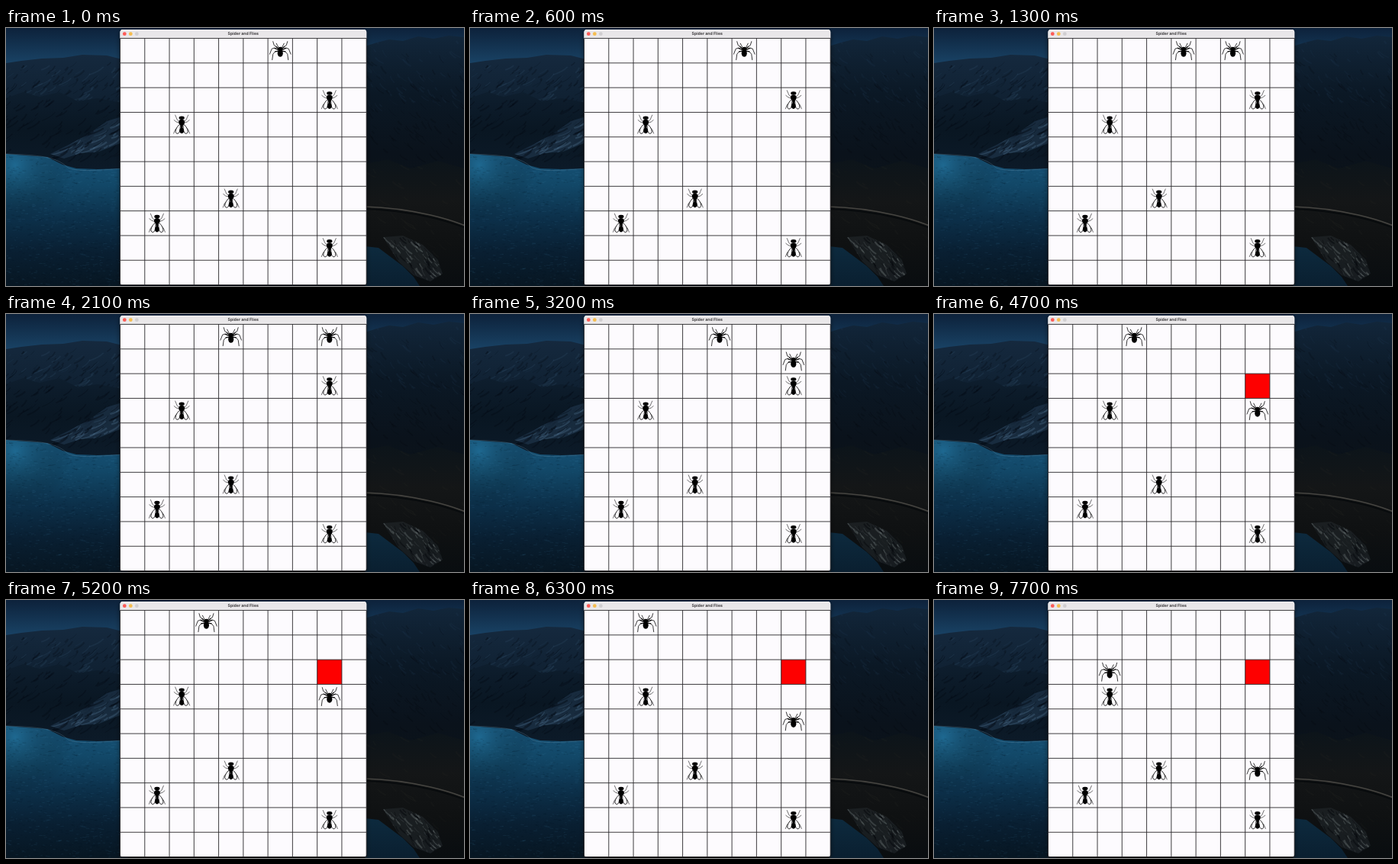
Animation of 600x338 px, one loop 8000 ms. Source, as an HTML page with a canvas:

```html
<!DOCTYPE html>
<html lang="en">
<head>
<meta charset="utf-8">
<title>Spider and Flies</title>
<style>
html, body { margin: 0; width: 100%; height: 100%; overflow: hidden; background: #0a1420; }
canvas { display: block; width: 100vw; height: 100vh; }
</style>
</head>
<body>
<canvas id="stage"></canvas>
<script>
const W = 600, H = 338, LOOP = 8000;
const FIRST_MOVE = 700, MOVE_EVERY = 1000;
const LEFT = 149.5, TOP = 13.55, CELL_W = 32.27, CELL_H = 32.3, SIZE = 10;

// Cells are [column, row]; one entry per move.
const spiders = [
  [[6, 0], [5, 0], [4, 0], [5, 0], [4, 0], [3, 0], [2, 0], [2, 1], [2, 2]],
  [[6, 0], [7, 0], [8, 0], [8, 1], [8, 2], [8, 3], [8, 4], [8, 5], [8, 6]]
];
const flies = [[8, 2], [2, 3], [4, 6], [1, 7], [8, 8]];

const canvas = document.getElementById('stage');
const scale = window.devicePixelRatio || 1;
canvas.width = W * scale;
canvas.height = H * scale;
const ctx = canvas.getContext('2d');
ctx.scale(scale, scale);

function seeded(seed) {
  return () => (seed = (seed * 16807) % 2147483647) / 2147483647;
}

function vertical(y0, y1, ...colors) {
  const g = ctx.createLinearGradient(0, y0, 0, y1);
  colors.forEach((c, i) => g.addColorStop(i / (colors.length - 1), c));
  return g;
}

function fillPath(d, color) {
  ctx.fillStyle = color;
  ctx.fill(new Path2D(d));
}

function strokePath(d, color, width) {
  ctx.strokeStyle = color;
  ctx.lineWidth = width;
  ctx.stroke(new Path2D(d));
}

function ellipse(x, y, rx, ry, color) {
  ctx.fillStyle = color;
  ctx.beginPath();
  ctx.ellipse(x, y, rx, ry, 0, 0, Math.PI * 2);
  ctx.fill();
}

function glow(x, y, r, color) {
  const g = ctx.createRadialGradient(x, y, 0, x, y, r);
  g.addColorStop(0, color);
  g.addColorStop(1, 'transparent');
  ctx.fillStyle = g;
  ctx.fillRect(x - r, y - r, 2 * r, 2 * r);
}

// Short strokes leaning one way inside a shape suggest gullies in a slope.
function gullies(d, [x0, y0, x1, y1], count, lean, color, seed) {
  const rnd = seeded(seed);
  ctx.save();
  ctx.clip(new Path2D(d));
  for (let i = 0; i < count; i++) {
    const x = x0 + rnd() * (x1 - x0), y = y0 + rnd() * (y1 - y0);
    const dy = 3 + rnd() * 8, dx = dy * lean * (0.5 + rnd());
    strokePath(`M${x},${y} q${dx * 0.3},${dy * 0.6} ${dx},${dy}`, color, 0.5 + rnd() * 1.8);
  }
  ctx.restore();
}

function ripples(x0, x1, y0, y1, count, seed) {
  const rnd = seeded(seed);
  for (let i = 0; i < count; i++) {
    const x = x0 + rnd() * (x1 - x0), y = y0 + rnd() * (y1 - y0);
    const color = rnd() < 0.5 ? 'rgba(80,150,190,.12)' : 'rgba(2,14,28,.2)';
    strokePath(`M${x},${y} l${1 + rnd() * 4},${rnd() - 0.5}`, color, 0.8);
  }
}

function drawLeftCoast() {
  ctx.fillStyle = vertical(160, H, '#17547a', '#124868', '#0c304a', '#091f32', '#071622');
  ctx.fillRect(0, 160, 160, H - 160);
  glow(12, 180, 75, 'rgba(40,130,175,.5)');
  ripples(0, 150, 168, H, 900, 11);

  const far = 'M0,46 L20,43 47,40 75,39 100,35 132,36 152,41 V165 H0 Z';
  fillPath(far, vertical(35, 165, '#15293e', '#0f2031', '#0b1928'));
  gullies(far, [0, 44, 160, 115], 110, -1, 'rgba(4,12,22,.3)', 5);
  gullies(far, [0, 44, 160, 110], 60, -1.4, 'rgba(52,84,112,.22)', 7);

  const near = 'M0,92 L22,84 44,90 70,84 94,96 120,92 152,98 V184 L120,185 92,184 74,179 54,169 26,167 0,165 Z';
  fillPath(near, vertical(84, 185, '#0e1e2e', '#091622', '#0c1a28'));
  gullies(near, [0, 90, 160, 168], 100, -1.2, 'rgba(3,9,16,.32)', 23);

  const lit = 'M152,116 L132,122 112,136 88,150 58,165 76,171 98,164 122,162 152,150 Z';
  fillPath(lit, 'rgba(40,68,94,.45)');
  gullies(lit, [65, 114, 165, 166], 55, -1.8, 'rgba(84,120,150,.3)', 31);
  gullies(lit, [65, 114, 165, 166], 45, -1.8, 'rgba(4,12,22,.5)', 37);
  strokePath('M0,165 Q40,166 56,170 T80,182 T152,184', 'rgba(110,155,180,.35)', 0.8);
}

function drawRightCoast() {
  const hills = 'M470,24 L486,19 502,15 520,17 540,11 560,14 580,10 600,12 V240 H470 Z';
  fillPath(hills, vertical(10, 240, '#12263a', '#0b1825', '#0a121b', '#0c1319'));
  gullies(hills, [465, 14, 610, 100], 70, 1, 'rgba(44,72,100,.13)', 41);
  gullies(hills, [465, 30, 610, 220], 110, 1, 'rgba(3,7,12,.2)', 53);

  const slope = 'M470,178 L500,172 530,184 566,174 600,184 V338 H470 Z';
  fillPath(slope, vertical(172, H, '#0c141a', '#141617', '#0f1112', '#090d10'));
  gullies(slope, [465, 178, 600, 320], 60, 1.2, 'rgba(50,48,42,.12)', 67);
  strokePath('M470,234 C505,235 530,239 556,245 S588,254 602,259', '#454440', 1.7);
  strokePath('M470,237 C505,238 530,242 556,248 S588,257 602,262', '#080b0d', 1.8);

  fillPath('M470,286 L488,288 504,300 520,312 534,326 542,338 H470 Z', vertical(286, H, '#0d2a3e', '#0a1f30'));
  const cliff = 'M494,274 L520,272 546,284 566,304 572,322 556,332 534,324 514,306 Z';
  fillPath(cliff, 'rgba(44,52,56,.4)');
  gullies(cliff, [490, 268, 575, 330], 80, 0.8, 'rgba(125,135,136,.3)', 71);
  gullies(cliff, [490, 268, 575, 330], 60, 0.8, 'rgba(3,6,9,.45)', 73);
}

function drawLandscape() {
  ctx.fillStyle = vertical(0, 50, '#0d223b', '#1a4568');
  ctx.fillRect(0, 0, W, 60);
  drawLeftCoast();
  drawRightCoast();
}

function drawWindow() {
  ctx.save();
  ctx.shadowColor = 'rgba(0,0,0,.6)';
  ctx.shadowBlur = 6 * scale;
  ctx.shadowOffsetY = 2 * scale;
  ctx.beginPath();
  ctx.roundRect(LEFT, 2, CELL_W * SIZE, 334.5, 3.5);
  ctx.fillStyle = '#fdfbfe';
  ctx.fill();
  ctx.restore();

  ctx.beginPath();
  ctx.roundRect(LEFT, 2, CELL_W * SIZE, TOP - 2, [3.5, 3.5, 0, 0]);
  ctx.fillStyle = '#e9e7e9';
  ctx.fill();
  ['#fc5b57', '#f5bd4f', '#d0ced0'].forEach((c, i) => ellipse(155.3 + i * 8, 7.7, 2.4, 2.4, c));

  ctx.fillStyle = '#3c3a3c';
  ctx.font = '700 5.2px Inter, sans-serif';
  ctx.textRendering = 'geometricPrecision';
  ctx.textAlign = 'center';
  ctx.fillText('Spider and Flies', 310.7, 9.4);
}

function drawGrid() {
  let d = '';
  for (let i = 0; i <= SIZE; i++) {
    d += `M${LEFT + i * CELL_W},${TOP} v${CELL_H * SIZE} M${LEFT},${TOP + i * CELL_H} h${CELL_W * SIZE}`;
  }
  strokePath(d, '#29282a', 0.9);
}

function mirrored(draw) {
  for (const side of [1, -1]) {
    ctx.save();
    ctx.scale(side, 1);
    draw();
    ctx.restore();
  }
}

function inCell([col, row], draw) {
  ctx.save();
  ctx.translate(LEFT + (col + 0.5) * CELL_W, TOP + (row + 0.5) * CELL_H);
  ctx.lineCap = ctx.lineJoin = 'round';
  draw();
  ctx.restore();
}

function fly() {
  mirrored(() => {
    strokePath('M3,-4 L6,-6.5 7,-9 8.5,-12.5 M3.5,-2.5 L7,-3.5 10,-6 M5,3 L8.5,6.5 10.5,11.5', '#222', 0.65);
    const wing = 'M1.8,-1 C4,0 8,5 8,9 C7.8,12.5 4,12.5 3,9.5 C2.2,7 1.6,3 1.8,-1 Z';
    fillPath(wing, '#fdfbfe');
    strokePath(wing, '#0c0c0c', 0.9);
  });
  ellipse(0, -8.8, 3.6, 2.2, '#000');
  ellipse(0, -3.2, 3.9, 3.6, '#000');
  fillPath('M-2,-1 L2,-1 1.1,4 C2.6,5.5 3.2,8 2.6,10 Q0,13.5 -2.6,10 C-3.2,8 -2.6,5.5 -1.1,4 Z', '#000');
}

function spider() {
  mirrored(() => {
    strokePath(
      'M1.5,-2 L5.5,-5.5 8,-7 9.5,-12 ' +
      'M2,-1 L7.5,-3.5 11,-2.5 13.8,4.5 ' +
      'M2,0.5 L6.5,1 9.5,4.5 10.5,12 ' +
      'M1.5,-3 L3.8,-7 5,-9.5', '#151515', 0.85);
    strokePath('M1.5,-2 L5.5,-5.2 M2,-1 L7.5,-3.3 M2,0.5 L6.5,1.2', '#0b0b0b', 1.2);
  });
  ellipse(0, -2.2, 2.7, 2.7, '#000');
  ellipse(0, 3.4, 3.6, 4.7, '#000');
}

function drawStep(step) {
  drawLandscape();
  drawWindow();
  for (const cell of flies) {
    const eaten = spiders.some(path => path.slice(0, step + 1).some(p => p + '' === cell + ''));
    if (eaten) {
      ctx.fillStyle = '#fe0000';
      ctx.fillRect(LEFT + cell[0] * CELL_W, TOP + cell[1] * CELL_H, CELL_W, CELL_H);
    } else {
      inCell(cell, fly);
    }
  }
  drawGrid();
  const cells = spiders.map(path => path[step]);
  (step ? cells : cells.slice(0, 1)).forEach(cell => inCell(cell, spider));
}

let shown = -1;
function tick() {
  const t = performance.now() % LOOP;
  const step = Math.max(0, Math.floor((t - FIRST_MOVE) / MOVE_EVERY) + 1);
  if (step !== shown) drawStep(shown = step);
  requestAnimationFrame(tick);
}
tick();
</script>
</body>
</html>
```
